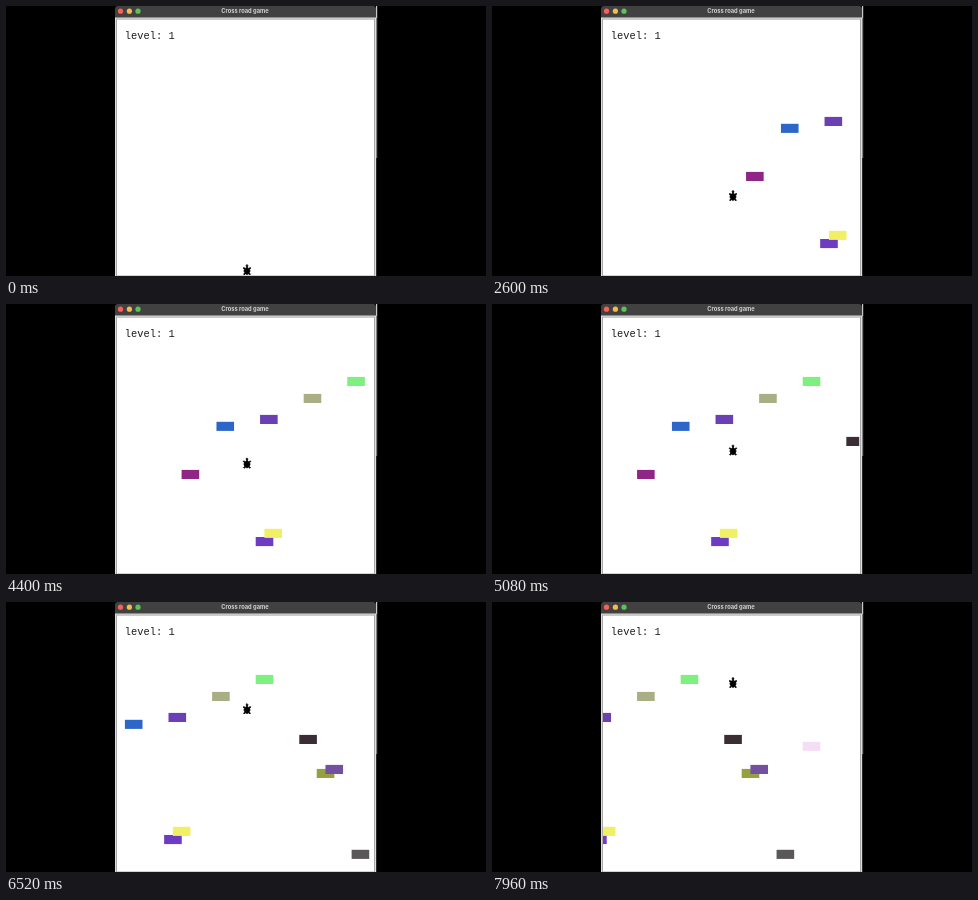
An HTML page that plays this animation: 480x270 px, repeating every 8000 ms.

```html
<!DOCTYPE html>
<html lang="en">
<head>
<meta charset="utf-8">
<title>Cross road game</title>
<style>
  html, body { margin: 0; width: 100%; height: 100%; overflow: hidden; background: #000; }
  svg { display: block; width: 100vw; height: 100vh; }
  .title { font: 700 5.75px Inter, sans-serif; fill: #d2d2d2; text-anchor: middle; }
  .level { font: 10.4px "Liberation Mono", monospace; fill: #1c1c1c; white-space: pre; }
</style>
</head>
<body>
<svg viewBox="0 0 480 270">
  <defs>
    <clipPath id="road"><rect x="111" y="13" width="256.2" height="257"/></clipPath>
  </defs>
  <rect width="480" height="270" fill="#000"/>
  <rect x="370" width="1.2" height="12" fill="#c8c8c8"/>
  <rect x="370" y="12" width="1.2" height="140" fill="#808080"/>
  <rect x="370" y="152" width="1" height="118" fill="#2a2a2a"/>
  <rect x="109" y="11" width="261" height="259" fill="#dedede"/>
  <path d="M109 11.6V3q0-3 3-3h255q3 0 3 3v8.6z" fill="#414141"/>
  <rect x="110" y="12.6" width="259" height="257.4" fill="#a8a8a8"/>
  <rect x="111" y="13.6" width="257" height="255.9" fill="#fff"/>
  <circle cx="114.5" cy="5.2" r="2.6" fill="#f6615a"/>
  <circle cx="123.4" cy="5.2" r="2.6" fill="#f3bd4a"/>
  <circle cx="132" cy="5.2" r="2.6" fill="#5bc454"/>
  <text class="title" x="239" y="7.2">Cross road game</text>
  <text class="level" x="118.8" y="32.6">level: 1</text>
  <g clip-path="url(#road)">
    <g id="cars"></g>
    <polygon id="player" stroke="#000" stroke-width="1.8" points="0,-16 -2,-14 -1,-10 -4,-7 -7,-9 -9,-8 -6,-5 -7,-1 -5,3 -8,6 -6,8 -4,5 0,7 4,5 6,8 8,6 5,3 7,-1 6,-5 9,-8 7,-9 4,-7 1,-10 2,-14"/>
  </g>
</svg>
<script>
const LOOP = 8000, TICK = 100.5, TICK_ZERO = 950;
const SCALE = 0.436, STRIDE = 10 * SCALE;
const START_X = 358.7, PLAYER_X = 241, PLAYER_Y = 265.5;

// spawn tick, centre y, colour
const CARS = [
  [-8, 170.5, '#8f2685'], [0, 122.4, '#2d66c9'],
  [9, 237.6, '#6d3cc2'], [10, 115.5, '#6b40b4'],
  [11, 229.4, '#f0ef66'], [20, 94.5, '#a9ae84'],
  [30, 77.5, '#7df07f'], [40, 137.5, '#3a2d33'],
  [44, 171.5, '#96a03e'], [46, 167.5, '#7451a0'],
  [52, 252.4, '#595757'], [58, 144.4, '#f5def5']
];

// tick, player moves made so far
const MOVES = [[-9, 0], [-2, 3], [0, 5], [16, 17], [27, 21], [41, 27], [55, 36], [69, 42]];

const group = document.getElementById('cars');
const player = document.getElementById('player');

const cars = CARS.map(([spawn, y, fill]) => {
  const node = document.createElementNS('http://www.w3.org/2000/svg', 'rect');
  const attrs = { y: y - 4.6, width: 17.6, height: 9.1, fill };
  for (const key in attrs) node.setAttribute(key, attrs[key]);
  group.append(node);
  return { node, spawn };
});

function movesAt(tick) {
  if (tick <= MOVES[0][0]) return 0;
  for (let i = 1; i < MOVES.length; i++) {
    const [a, from] = MOVES[i - 1], [b, to] = MOVES[i];
    if (tick <= b) return from + Math.floor((tick - a) * (to - from) / (b - a));
  }
  return MOVES.at(-1)[1];
}

function draw(time) {
  const tick = Math.floor((time - TICK_ZERO) / TICK);
  for (const { node, spawn } of cars) {
    node.setAttribute('x', START_X - STRIDE * (tick - spawn));
    node.setAttribute('visibility', tick < spawn ? 'hidden' : 'visible');
  }
  const y = PLAYER_Y - STRIDE * movesAt(tick);
  player.setAttribute('transform', `translate(${PLAYER_X} ${y}) scale(${SCALE})`);
}

const start = performance.now();
function frame() {
  draw((performance.now() - start) % LOOP);
  requestAnimationFrame(frame);
}
frame();
</script>
</body>
</html>
```
